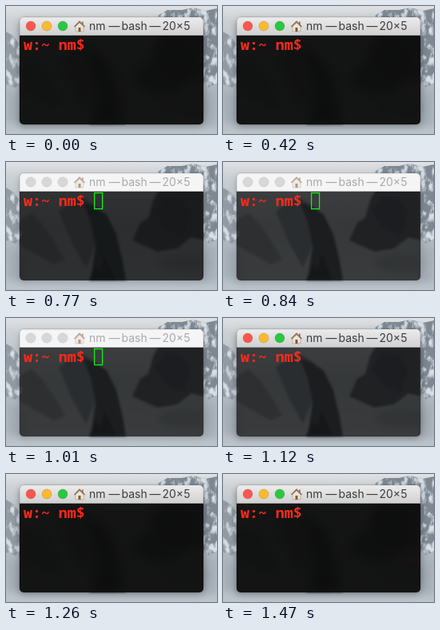
Animation, 264 px wide and 160 px high, one loop 1.61 s. Source, as an HTML page:

```html
<!DOCTYPE html>
<html lang="en">
<head>
<meta charset="utf-8">
<title>Terminal focus</title>
<style>
html, body { margin: 0; width: 100%; height: 100%; overflow: hidden; background: #c3c9ce; }
svg { display: block; width: 264px; height: 160px; }
.title { font: 400 14px Inter, "Liberation Sans", sans-serif; fill: #3c3c3c; }
.prompt { font: 600 18.3px "Noto Sans Mono", "DejaVu Sans Mono", monospace; fill: #ff2a1a; white-space: pre; }
.idle .title { fill: #a9a9a9; }
.idle #house { opacity: .6; }
.idle #lights circle { fill: #d8d8d8; stroke: #c6c6c6; }
.idle #bar { fill: #f5f5f5; }
#cursor { visibility: hidden; }
.idle #cursor { visibility: visible; }
.idle #shadow { opacity: .2; }
</style>
</head>
<body>
<svg id="stage" viewBox="0 0 264 160">
  <defs>
    <linearGradient id="sky" x2="0" y2="1">
      <stop stop-color="#dfe1e3"/><stop offset=".12" stop-color="#cbd0d4"/>
      <stop offset=".5" stop-color="#acb5bc"/><stop offset="1" stop-color="#bcc4cb"/>
    </linearGradient>
    <linearGradient id="chrome" x2="0" y2="1">
      <stop stop-color="#ececec"/><stop offset="1" stop-color="#d0d0d0"/>
    </linearGradient>
    <filter id="soft"><feGaussianBlur stdDeviation="1.5"/></filter>
    <filter id="haze" x="-20%" y="-20%" width="140%" height="140%"><feGaussianBlur stdDeviation="5"/></filter>
    <filter id="blur"><feGaussianBlur id="blurSize" stdDeviation="8"/></filter>
    <!-- snow speckles on rock -->
    <filter id="rock" color-interpolation-filters="sRGB">
      <feTurbulence type="fractalNoise" baseFrequency=".13 .08" numOctaves="4" seed="4"/>
      <feColorMatrix values="0 0 0 0 .84  0 0 0 0 .87  0 0 0 0 .9  4 0 0 0 -1.75"/>
      <feComposite in2="SourceAlpha" operator="in" result="snow"/>
      <feMerge><feMergeNode in="SourceGraphic"/><feMergeNode in="snow"/></feMerge>
    </filter>
    <clipPath id="frame"><rect x="17" y="14" width="230" height="134" rx="5"/></clipPath>
    <clipPath id="pane"><rect x="17" y="37" width="230" height="111"/></clipPath>

    <g id="photo">
      <rect width="264" height="160" fill="url(#sky)"/>
      <g filter="url(#soft)">
        <path fill="#8c959d" d="M17 72 32 64 46 78 60 98 74 122 60 128 17 104Z"/>
        <path fill="#838c94" d="M66 62 84 48 98 46 114 56 112 104 100 132 84 104Z"/>
        <path fill="#49525a" d="M96 50 112 56 126 66 138 90 146 124 150 148 106 148 112 106 106 76Z"/>
        <path fill="#596169" d="M158 98 168 76 178 70 184 48 194 30 247 20 247 98 232 94 214 108 190 112Z"/>
        <path fill="#4b535b" d="M186 62 200 44 220 46 232 64 222 92 200 84Z"/>
        <path fill="#353c42" d="M104 148 112 128 118 136 123 116 130 130 138 148Z"/>
      </g>
      <g filter="url(#rock)">
        <path fill="#7e8891" d="M190 12 202 5 220 5 234 2 250 6 264 3 264 96 254 102 247 94 247 20 190 20Z"/>
        <path fill="#929ba3" d="M0 32 10 38 18 50 20 92 12 102 0 98Z"/>
      </g>
      <g filter="url(#haze)">
        <path fill="#a4adb5" d="M0 104 20 112 24 150 0 146ZM244 104 264 106 264 150 244 150Z"/>
        <ellipse cx="224" cy="126" rx="34" ry="12" fill="#9ea7ae"/>
      </g>
    </g>
  </defs>

  <use href="#photo"/>
  <rect id="shadow" x="17" y="18" width="230" height="132" rx="6" fill="#000" opacity=".38" filter="url(#haze)"/>

  <g clip-path="url(#frame)">
    <g clip-path="url(#pane)">
      <use href="#photo" filter="url(#blur)"/>
      <rect id="tint" x="17" y="37" width="230" height="111" fill="#0a0a0a"/>
    </g>
    <rect id="bar" x="17" y="14" width="230" height="23" fill="url(#chrome)"/>
    <path d="M17 14.5H247" stroke="#fff9"/>
    <path d="M17 36.5H247" stroke="#0003"/>
  </g>
  <rect x="17" y="14" width="230" height="134" rx="5" fill="none" stroke="#0004" stroke-width=".7"/>

  <g id="lights" stroke="#0003" stroke-width=".7">
    <circle cx="31" cy="25" r="6" fill="#fc5550"/>
    <circle cx="51" cy="25" r="6" fill="#fdb92d"/>
    <circle cx="71" cy="25" r="6" fill="#2ac840"/>
  </g>
  <g id="house">
    <path d="M87 25.5 92 21 97 25.5V32H87Z" fill="#eee5d6" stroke="#a39480" stroke-width=".6"/>
    <path d="M95 19.5h1.7v4H95Z" fill="#93735b"/>
    <path d="M85.5 26 92 19.5 98.5 26" fill="none" stroke="#8c705c" stroke-width="1.6"/>
    <path d="M90.5 27h3v5h-3Z" fill="#80583c"/>
  </g>
  <text class="title" y="30"><tspan x="104">nm</tspan><tspan x="128.5">—</tspan><tspan x="144.5">bash</tspan><tspan x="179.5">—</tspan><tspan x="195.5">20×5</tspan></text>
  <text class="prompt" x="22" y="55">w:~ nm$</text>
  <rect id="cursor" x="110.6" y="38.6" width="10" height="20" fill="none" stroke="#12f012" stroke-width="1.3"/>
</svg>
<script>
const $ = id => document.getElementById(id);
// end time in ms, idle window, tint opacity, backdrop blur
const steps = [
  [700, false, .94, 6],
  [770, true, .92, 1],
  [840, true, .79, 0],
  [1120, true, .73, 0],
  [1190, false, .73, 0],
  [1260, false, .79, 6],
  [1610, false, .94, 6]
];
const start = performance.now();
let shown;

function draw(now) {
  const t = Math.max(0, now - start) % 1610;
  const step = steps.find(s => t < s[0]);
  if (step !== shown) {
    const [, idle, tint, blur] = shown = step;
    $("stage").classList.toggle("idle", idle);
    $("tint").setAttribute("opacity", tint);
    $("blurSize").setAttribute("stdDeviation", blur);
  }
  requestAnimationFrame(draw);
}
draw(start);
</script>
</body>
</html>
```
